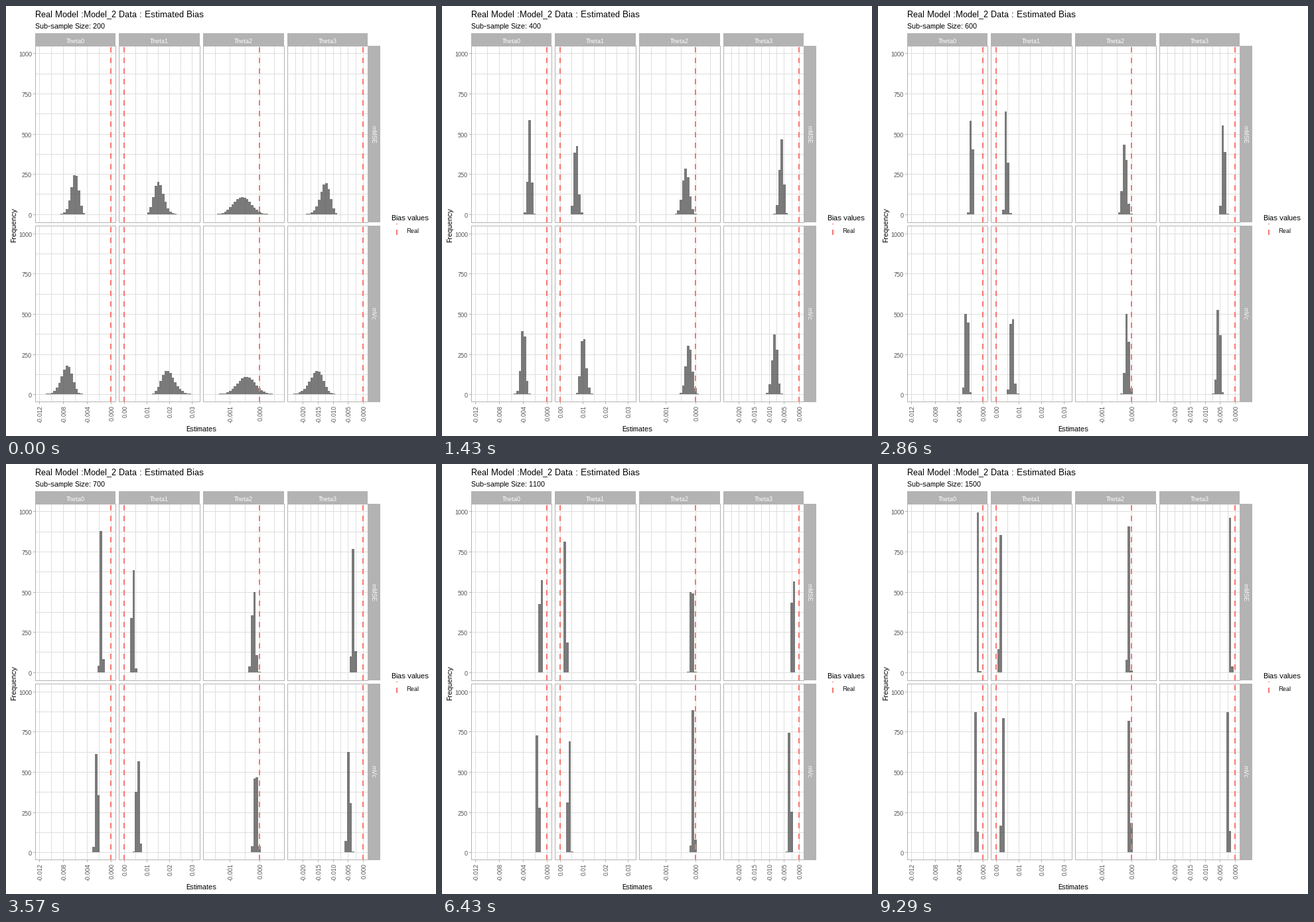
A matplotlib script that plays this animation: 648x648 px, repeating every 10 s.

```python
import math

import matplotlib.pyplot as plt
from matplotlib.animation import FuncAnimation
from matplotlib.collections import PolyCollection
from matplotlib.patches import Rectangle

plt.rcParams.update({
    "font.family": "Liberation Sans",
    "text.hinting": "native",
    "text.hinting_factor": 1,
})

SIZE = 648
LOOP, TICK = 10000, 50
STAGES = 14                     # sub-sample sizes 200, 300, ... 1500

GREY, GRID, RED = "#b3b3b3", "#dedede", "#f8766d"
LABEL = "#4d4d4d"

# Panel layout in pixels, y pointing down
PANEL_W, PANEL_STEP, LEFT = 121.25, 126.75, 44
BIN = PANEL_W / 33
COUNT_PX = 0.2425
ROWS = [(60, 326, 314.3), (331, 597, 585.7)]   # top, bottom, zero line

# zero position, pixels per axis step, step, major ticks, decimals, side of the bars
COLS = [
    (158.3, 36.0, 0.004, range(-3, 1), 3, -1),
    (178.4, 34.1, 0.01, range(0, 4), 2, 1),
    (382.4, 44.6, 0.001, range(-1, 1), 3, -1),
    (538.5, 22.65, 0.005, range(-4, 1), 3, -1),
]

# Bias in bins is (a + b/n) / n. Its spread is c + d/n on a log scale,
# or (c + d/n) / n where the estimates straddle zero (column 2).
TREND = [
    [(2660, 56000, .070, 7), (2440, 83000, .092, 9),
     (1710, -60000, 360, 74000), (2615, 99000, .094, 7.5)],
    [(4100, -100000, .055, 14), (4090, -96000, .061, 18),
     (1040, 4000, 260, 94000), (4100, -57000, .060, 17)],
]

fig = plt.figure(figsize=(SIZE / 72, SIZE / 72), dpi=72, facecolor="white")
ax = fig.add_axes([0, 0, 1, 1])
ax.set_xlim(0, SIZE)
ax.set_ylim(SIZE, 0)
ax.axis("off")


def box(x0, y0, x1, y1, color, z):
    ax.add_patch(Rectangle((x0, y0), x1 - x0, y1 - y0, fc=color, lw=0,
                           antialiased=False, zorder=z))


def hline(y, x0, x1, color, z=1):
    box(x0, y, x1, y + 1, color, z)


def vline(x, y0, y1, color, z=1):
    box(x, y0, x + 1, y1, color, z)


def dashes(x, top, bottom):
    """Two-pixel dashed line, drawn from the bottom upwards."""
    for y in range(bottom, top, -16):
        box(x - 1, max(y - 8, top), x + 1, y, RED, 4)


def text(x, y, s, size, color="black", ha="left", va="baseline", rot=0):
    return ax.text(x, y, s, size=size, color=color, ha=ha, va=va,
                   rotation=rot, zorder=6)


def draw_panel(row, col):
    top, bottom, base = ROWS[row]
    zero, step_px, step, majors, digits, _ = COLS[col]
    x0 = int(LEFT + col * PANEL_STEP)
    x1 = int(LEFT + col * PANEL_STEP + PANEL_W + 0.3)

    for i in range(9):
        hline(int(base - i * 125 * COUNT_PX), x0, x1, GRID)
    for half in range(-9, 8):
        x = int(zero + half * step_px / 2)
        if x0 + 2 < x < x1 - 2:
            vline(x, top, bottom, GRID)

    dashes(int(zero), top, bottom)
    hline(top, x0, x1 + 1, GREY, 5)
    hline(bottom - row, x0, x1 + 1, GREY, 5)
    vline(x0, top, bottom, GREY, 5)
    vline(x1, top, bottom, GREY, 5)

    if row == 0:
        box(x0, 41, x1, 60, GREY, 5)
        text((x0 + x1) / 2, 56, f"Theta{col}", 9, "white", "center")
    else:
        for m in majors:
            x = int(zero + m * step_px)
            vline(x, 597, 600, GREY)
            text(x + 2, 602, f"{m * step:.{digits}f}", 9, LABEL,
                 "center", "top", 90)


def draw_static():
    for row, name in enumerate(["mMSE", "mVc"]):
        top, bottom, base = ROWS[row]
        for col in range(4):
            draw_panel(row, col)
        box(545, top, 564, bottom, GREY, 5)
        text(552.5, (top + bottom) / 2, name, 9, "white", "center", "center", -90)
        for count in range(0, 1001, 250):
            y = int(base - count * COUNT_PX)
            hline(y, 41, 44, GREY)
            text(39, y + 5, str(count), 9, LABEL, "right")

    text(44, 16, "Real Model :Model_2 Data : Estimated Bias", 13)
    text(294, 641, "Estimates", 11, ha="center")
    text(12, 330, "Frequency", 11, ha="center", va="center", rot=90)
    text(581, 323, "Bias values", 11)
    dashes(589, 328, 345)
    text(603, 342, "Real", 9)


def share_below(t, col, centre, spread):
    """Share of estimates whose distance from zero is below t bins."""
    if col == 2:
        z = (t - centre) / spread
    elif t <= 0:
        return 0.0
    else:
        z = math.log(t / centre) / spread
    return 0.5 * (1 + math.erf(z / math.sqrt(2)))


def bars(row, col, n):
    zero, side = COLS[col][0], COLS[col][5]
    base = int(ROWS[row][2])
    a, b, c, d = TREND[row][col]
    centre = (a + b / n) / n
    spread = c + d / n
    if col == 2:
        spread /= n
    for k in range(-8 if col == 2 else 0, 30):
        share = (share_below(k + 0.5, col, centre, spread)
                 - share_below(k - 0.5, col, centre, spread))
        count = round(1000 * share)
        if count < 2:
            continue
        mid = zero + side * k * BIN
        left, right = int(mid - BIN / 2), int(mid + BIN / 2)
        y = base - max(1, round(count * COUNT_PX))
        yield [(left, base), (left, y), (right, y), (right, base)]


draw_static()
subtitle = text(44, 34, "", 11)
hist = PolyCollection([], facecolors="#595959", alpha=0.8, linewidths=0,
                      antialiaseds=False, zorder=3)
ax.add_collection(hist, autolim=False)


def update(i):
    # A stage begins in the tick that holds its start time
    stage = ((i + 1) * TICK - 1) * STAGES // LOOP
    n = 200 + 100 * stage
    subtitle.set_text(f"Sub-sample Size: {n}")
    hist.set_verts([v for row in range(2) for col in range(4)
                    for v in bars(row, col, n)])
    return subtitle, hist


anim = FuncAnimation(fig, update, frames=LOOP // TICK, interval=TICK,
                     repeat=True, repeat_delay=0, blit=False)
plt.show()
```
